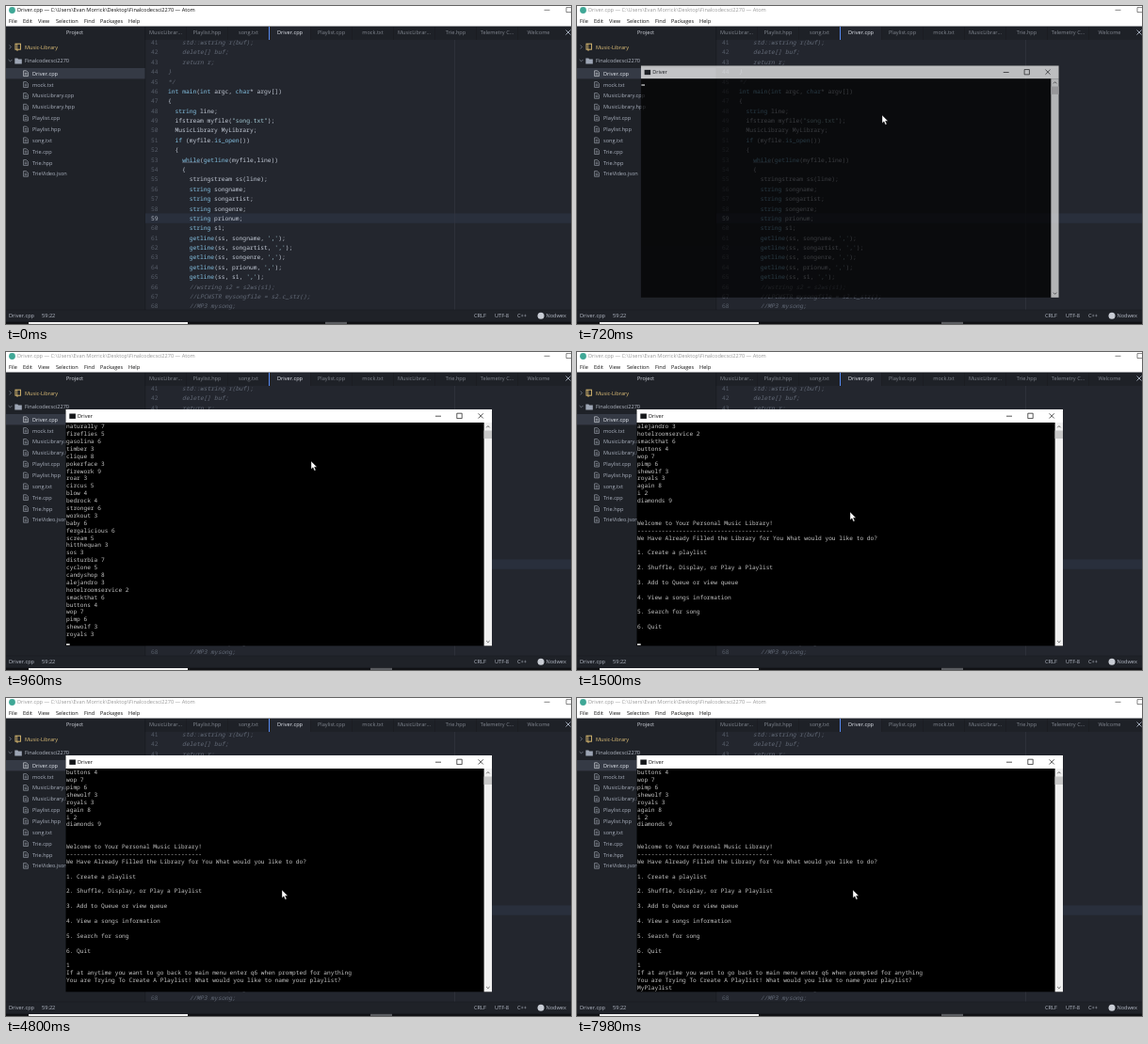
These frames come from a looping animation (600 by 338 pixels, 8000 ms). An HTML page:

```html
<!DOCTYPE html>
<html lang="en">
<head>
<meta charset="utf-8">
<title>Music library console</title>
<style>
html, body { margin: 0; width: 100%; height: 100%; overflow: hidden; background: #23262e; }
svg { display: block; width: 100vw; height: 100vh; }
text { white-space: pre; text-rendering: geometricPrecision; }
.ui { font: 5.6px "Open Sans", "Noto Sans", sans-serif; }
.code { font: 6.3px "Noto Sans Mono", "DejaVu Sans Mono", monospace; }
.con { font: 6.17px "Noto Sans Mono", "DejaVu Sans Mono", monospace; fill: #c4c4c4; }
.note { font-style: italic; }
</style>
</head>
<body>
<svg id="stage" viewBox="0 0 600 338">
  <defs>
    <clipPath id="page"><rect x="148" y="36" width="452" height="287"/></clipPath>
  </defs>
</svg>
<script>
const LOOP = 8000, STEP = 60;
const stage = document.getElementById("stage");

function add(parent, tag, attrs, content) {
  const el = document.createElementNS("http://www.w3.org/2000/svg", tag);
  for (const k in attrs) el.setAttribute(k, attrs[k]);
  if (content !== undefined) el.textContent = content;
  parent.appendChild(el);
  return el;
}
const box = (p, x, y, width, height, fill) => add(p, "rect", { x, y, width, height, fill });
const line = (p, d, stroke, w = 0.6) =>
  add(p, "path", { d, stroke, fill: "none", "stroke-width": w });
const label = (p, x, y, s, fill, anchor = "start") =>
  add(p, "text", { class: "ui", x, y, fill, "text-anchor": anchor }, s);

// Editor frame
box(stage, 0, 0, 600, 338, "#23262e");
box(stage, 0, 22, 148, 301, "#1f2228");
box(stage, 148, 22, 452, 14, "#1e2127");
box(stage, 0, 0, 600, 21.5, "#ffffff");
add(stage, "circle", { cx: 6.5, cy: 4.5, r: 3.4, fill: "#3fa796" });
const title = label(stage, 12, 6.4,
  "Driver.cpp \u2014 C:\\Users\\Evan Morrick\\Desktop\\Finalcodecsci2270 \u2014 Atom", "#111");
line(stage, "M571.5 4.3h6M595 1.6h6v5h-6z", "#333");
[["File", 3], ["Edit", 18], ["View", 34], ["Selection", 53], ["Find", 83],
 ["Packages", 100], ["Help", 130]].forEach(([s, x]) => label(stage, x, 17.8, s, "#111"));

// Tabs
const tabs = ["MusicLibrar...", "Playlist.hpp", "song.txt", "Driver.cpp", "Playlist.cpp",
  "mock.txt", "MusicLibrar...", "Trie.hpp", "Telemetry C...", "Welcome"];
tabs.forEach((s, i) => {
  const x = 147.5 + 44 * i, on = i === 3;
  if (on) {
    box(stage, x, 22, 44, 14, "#23262e");
    box(stage, x - 0.5, 22, 1, 14, "#568af2");
  } else box(stage, x, 22, 0.5, 14, "#181a1f");
  label(stage, x + 22, 30.4, s, on ? "#e2e6ee" : "#81868f", "middle");
});
line(stage, "M594.5 25.5l5 5M599.5 25.5l-5 5", "#9da5b4", 1);

// Project tree
label(stage, 73, 30.4, "Project", "#d3d7df", "middle");
line(stage, "M3.6 41.6l1.8 1.9l-1.8 1.9", "#9da5b4");
box(stage, 10, 40.2, 5.4, 6, "none").setAttribute("stroke", "#d8b870");
line(stage, "M11.8 40.2v6M12 46v2", "#d8b870", 0.8);
label(stage, 20, 45.5, "Music-Library", "#e0c078");
line(stage, "M2.6 57l1.9 1.9l1.9-1.9", "#9da5b4");
add(stage, "path", { d: "M9.3 55.5h3l.8 1h3.7v5h-7.5z", fill: "#9da5b4" });
label(stage, 20, 60.2, "Finalcodecsci2270", "#b4bac6");
box(stage, 0, 66, 148, 11.4, "#353a45");
["Driver.cpp", "mock.txt", "MusicLibrary.cpp", "MusicLibrary.hpp", "Playlist.cpp",
 "Playlist.hpp", "song.txt", "Trie.cpp", "Trie.hpp", "TrieVideo.json"].forEach((s, i) => {
  const y = 71.7 + 11.85 * i, c = i ? "#a9b0bd" : "#e4e8ef";
  line(stage, `M18.6 ${y - 2.9}h3l1.8 1.8v4h-4.8zM19.7 ${y - 0.4}h2.6M19.7 ${y + 1.2}h2.6`, c);
  label(stage, 28, y + 2, s, c);
});
box(stage, 147.6, 22, 0.6, 301, "#181a1f");

// Code
const page = add(stage, "g", { "clip-path": "url(#page)" });
const rowY = n => 220.4 + (n - 59) * 10.38;
box(page, 148, rowY(59), 452, 10.4, "#292f3c");
box(page, 476, 36, 0.6, 287, "#343842");
const code = `    std::wstring r(buf);
    delete[] buf;
    return r;
}
*/
int main(int argc, char* argv[])
{
  string line;
  ifstream myfile("song.txt");
  MusicLibrary MyLibrary;
  if (myfile.is_open())
  {
    while(getline(myfile,line))
    {
      stringstream ss(line);
      string songname;
      string songartist;
      string songenre;
      string prionum;
      string s1;
      getline(ss, songname, ',');
      getline(ss, songartist, ',');
      getline(ss, songenre, ',');
      getline(ss, prionum, ',');
      getline(ss, s1, ',');
      //wstring s2 = s2ws(s1);
      //LPCWSTR mysongfile = s2.c_str();
      //MP3 mysong;`.split("\n");
const token = /("[^"]*"|'[^']*')|\b(int|char|string|if|while|getline|main|is_open)\b/;
code.forEach((s, i) => {
  const n = 41 + i, y = rowY(n) + 7.5;
  add(page, "text", { class: "code", x: 161.5, y, "text-anchor": "end",
    fill: n === 59 ? "#b4bac6" : "#565c68" }, n);
  const note = n < 46 || n > 65;
  const row = add(page, "text", { class: note ? "code note" : "code",
    x: 172, y, fill: note ? "#636a77" : "#c3cad6" }, note ? s : "");
  if (note) return;
  s.split(token).forEach((part, k) => {
    if (part) add(row, "tspan", { fill: ["#c3cad6", "#a6cdd8", "#86c3e4"][k % 3] }, part);
  });
});
line(page, "M187 166.3h19", "#7d8796", 0.5);
const caret = box(page, 251.4, 220.6, 0.9, 10, "#568af2");

// Status bar and taskbar
box(stage, 0, 323, 600, 12.6, "#1f2228");
box(stage, 0, 322.7, 600, 0.5, "#181a1f");
[["Driver.cpp", 3], ["59:22", 38], ["CRLF", 497], ["UTF-8", 519], ["C++", 543],
 ["Nodwex", 573.5]].forEach(([s, x]) => label(stage, x, 331.2, s, "#b4bac6"));
add(stage, "circle", { cx: 568, cy: 329.2, r: 3.5, fill: "#c8ccd4" });
box(stage, 0, 335.6, 600, 2.4, "#101114");
box(stage, 24, 336, 169, 2, "#f2f2f2");
const slot = box(stage, 339, 335.8, 23, 2.2, "#5a5c60");

// Console window
const win = add(stage, "g", {});
box(win, 63.5, 61, 452.5, 251.3, "#000");
box(win, 63.5, 61, 452.5, 14, "#fff");
box(win, 67.3, 65.5, 6.6, 5.4, "#15171a");
label(win, 76, 70.2, "Driver", "#111");
line(win, "M456 68.2h6M478.8 65.2h5.4v5.4h-5.4zM501.6 65.3l5.2 5.2M506.8 65.3l-5.2 5.2", "#111", 0.7);
box(win, 507.6, 75, 8.4, 237.3, "#f0f0f0");
box(win, 507.6, 83.5, 8.4, 8.5, "#c8c8c8");
line(win, "M510.2 80.3l1.7-1.7l1.7 1.7M510.2 307l1.7 1.7l1.7-1.7", "#444", 0.8);
const ROWS = 30, PITCH = 7.89, CHAR = 3.7;
const rows = Array.from({ length: ROWS }, (_, i) =>
  add(win, "text", { class: "con", x: 64, y: 81.2 + i * PITCH }));
const dash = box(win, 64, 310, CHAR, 1.6, "#e6e6e6");

const arrow = add(stage, "path", { d: "M0 0v8.6l2-1.8l1.5 3.4l1.5-.7l-1.5-3.2h2.7z",
  fill: "#fff", stroke: "#111", "stroke-width": 0.4 });

// Printed text
const songs = ("naturally 7,fireflies 5,gasolina 6,timber 3,clique 8,pokerface 3,firework 9,roar 3," +
  "circus 5,blow 4,bedrock 4,stronger 6,workout 3,baby 6,fergalicious 6,scream 5,hitthequan 3," +
  "sos 3,disturbia 7,cyclone 5,candyshop 8,alejandro 3,hotelroomservice 2,smackthat 6,buttons 4," +
  "wop 7,pimp 6,shewolf 3,royals 3,again 8,i 2,diamonds 9").split(",");
const menu = ["Create a playlist", "Shuffle, Display, or Play a Playlist",
  "Add to Queue or view queue", "View a songs information", "Search for song", "Quit"];
const log = [...songs, "", "", "Welcome to Your Personal Music Library!", "-".repeat(39),
  "We Have Already Filled the Library for You What would you like to do?", "",
  ...menu.flatMap((s, i) => [`${i + 1}. ${s}`, ""])];
const MENU_END = log.length;
log.push("1", "If at anytime you want to go back to main menu enter q6 when prompted for anything",
  "You are Trying To Create A Playlist! What would you like to name your playlist?");

// Step tables: [time, value]
const printed = [[0, 0], [840, 12], [900, 22], [960, 29], [1080, 32], [1140, MENU_END],
  [4320, log.length]];
const typed = [[0, ""], [3240, "1"], [4320, ""], [6060, "M"], [6240, "My"], [6720, "MyP"],
  [6960, "MyPl"], [7140, "MyPla"], [7320, "MyPlay"], [7500, "MyPlayl"], [7620, "MyPlayli"],
  [7740, "MyPlaylis"], [7860, "MyPlaylist"]];
const blinks = [1620, 1920, 2280, 2580, 2880, 3180, 3540, 3840, 4140, 4320, 4800, 5100,
  5460, 5760, 6420, 6660, 7980];
const fade = [[0, 0], [660, 0.3], [720, 0.7], [780, 1]];
const path = [[480, 324, 116], [1020, 324, 116], [1260, 291, 168], [1500, 290, 170], [1920, 293, 204]];

const at = (table, t) => table.reduce((v, [time, value]) => (t >= time ? value : v), table[0][1]);

function pointer(t) {
  const i = path.findIndex(p => p[0] > t);
  if (i < 1) return path[i < 0 ? path.length - 1 : 0].slice(1);
  const [a, b] = [path[i - 1], path[i]];
  const k = (t - a[0]) / (b[0] - a[0]), e = k * k * (3 - 2 * k);
  return [1, 2].map(j => a[j] + (b[j] - a[j]) * e);
}

const show = (el, on) => el.setAttribute("visibility", on ? "visible" : "hidden");

function draw(now) {
  const t = Math.floor((now % LOOP) / STEP) * STEP;
  show(caret, t >= 240 && t < 480);
  title.setAttribute("fill", t < 540 ? "#111" : "#999");
  slot.setAttribute("x", t < 660 ? 339 : 387);

  const open = at(fade, t), scale = 0.935 + 0.065 * open;
  win.setAttribute("opacity", open);
  win.setAttribute("transform", `translate(289.7 186.3) scale(${scale}) translate(-289.7 -186.3)`);

  const input = at(typed, t);
  const view = [...log.slice(0, at(printed, t)), input].slice(-ROWS);
  rows.forEach((r, i) => {
    const s = view[i] || "";
    if (r.textContent !== s) r.textContent = s;
  });
  dash.setAttribute("x", 64 + input.length * CHAR);
  dash.setAttribute("y", 310 - (ROWS - view.length) * PITCH);
  show(dash, blinks.filter(b => b <= t).length % 2 === 0);

  show(arrow, t >= 480);
  arrow.setAttribute("transform", `translate(${pointer(t).join(" ")})`);
}

function tick() {
  draw(performance.now());
  requestAnimationFrame(tick);
}
tick();
</script>
</body>
</html>
```
